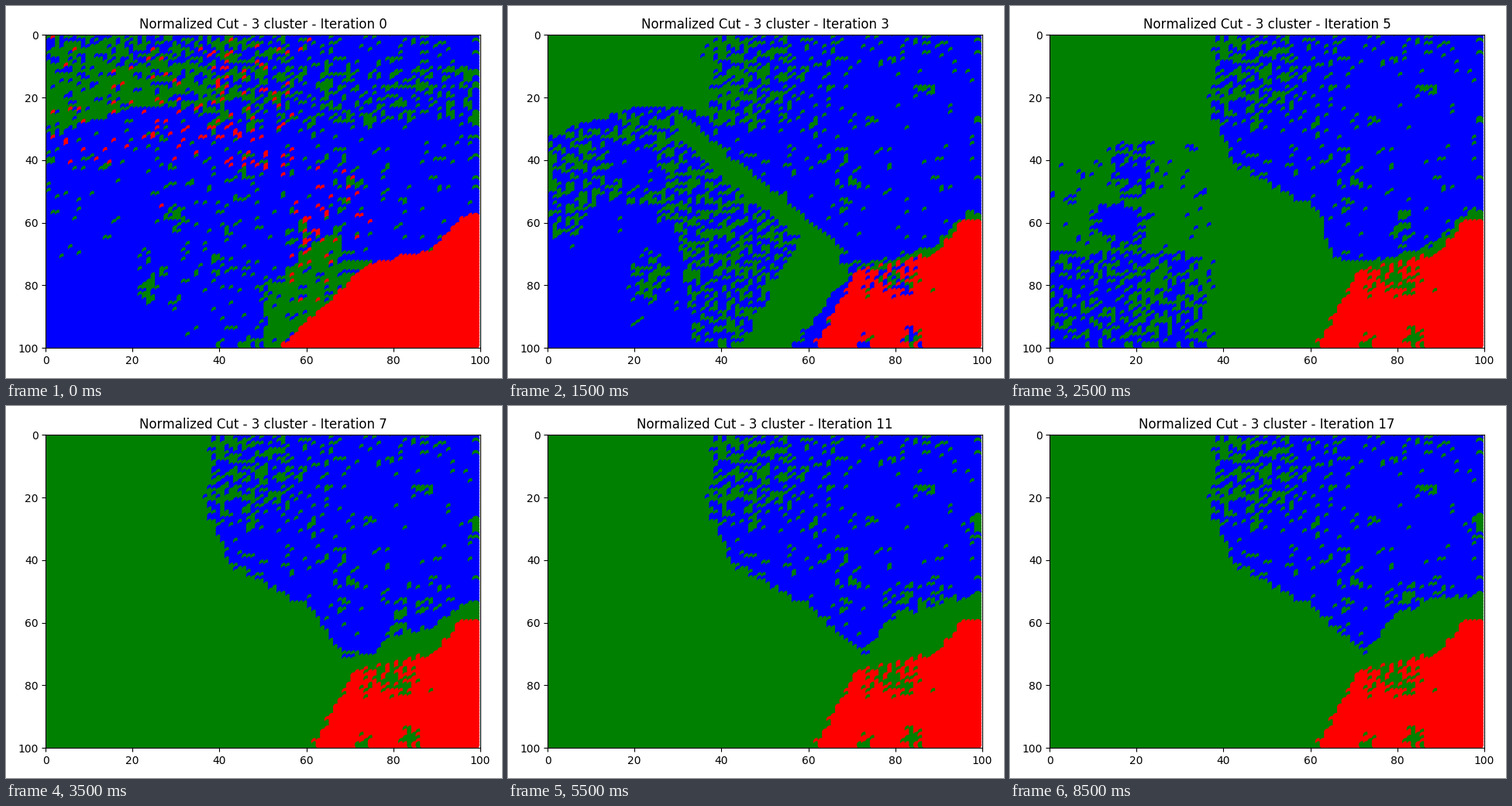
Animation, 640 px wide and 480 px high, one loop 9000 ms. Source, as a matplotlib script:

```python
import numpy as np
import matplotlib.pyplot as plt
from matplotlib.animation import FuncAnimation

N, STEPS = 100, 18
COLORS = np.array([(0, 0, 1, 1), (0, 0.5, 0, 1), (1, 0, 0, 1)])
X, Y = np.meshgrid(np.arange(N), np.arange(N))
# Overlapping discs leave only their upper left part visible.
x, y = X - 0.4, Y - 0.8
up = 100 - y


def ramp(v, a, b):
    """0 before a, 1 after b, straight in between."""
    return np.clip((v - a) / (b - a), 0, 1)


def inside(d, soft=1.5):
    """Soft test for a positive distance."""
    return np.clip(0.5 + d / soft, 0, 1)


def bump(cx, cy, rx, ry):
    r2 = ((x - cx) / rx) ** 2 + ((y - cy) / ry) ** 2
    return np.exp(-r2**2)


def mix(a, b, t):
    return a + (b - a) * t


def ranked_noise(seed, along, down):
    """Evenly spread noise with slight streaks."""
    n = np.random.default_rng(seed).random((N, N))
    n = n + along * np.roll(n, 1, axis=1) + down * np.roll(n, 1, axis=0)
    return n.ravel().argsort().argsort().reshape(N, N) / N**2


green_noise = ranked_noise(4, 0.3, 0.2)
red_noise = ranked_noise(9, 0, 0)

# Edges shared by several stages
red_top = 73 - 5 * ramp(x, 74, 89) - 11 * ramp(x, 89, 96)
crown = 32 - 9 * ramp(x, 0, 20) + 5 * ramp(x, 30, 40)
diagonal = 31 + 1.15 * (x - 32)

# Chance of green inside the blue area
haze = (0.03 + 0.5 * ramp(-x, -66, -40) * ramp(-y, -30, -21)
        + 0.13 * ramp(-y, -11, -3)
        + 0.06 * ramp(-x, -75, -50) * ramp(-y, -60, -40)
        + 0.25 * bump(68, 47, 2.5, 10) + 0.4 * bump(86, 18, 4, 2))


def first_green():
    crown_part = 0.62 + 0.27 * ramp(y, 6, 13) - 0.55 * ramp(x, 24, 52)
    wedge = inside(y - 82 + 1.25 * (x - 50)) * inside(x - 50) * inside(68 - x)
    seam = inside(y - 72) * inside(x - 66) * inside(75 - x)
    strays = 0.05 + 0.06 * bump(40, 65, 14, 35)
    strays = strays * inside(70 - y - 40 * ramp(x, 15, 22) + 80 * ramp(x, 22, 30))
    clumps = (0.5 * bump(30, 57, 3, 3) + 0.45 * bump(22, 70, 2.5, 5)
              + 0.5 * bump(24, 82, 2, 5) + 0.45 * bump(48, 98, 3, 3)
              + 0.45 * bump(59, 64, 4, 5))
    left = np.maximum(strays + clumps, crown_part * inside(crown - y))
    field = np.where(x > 40, np.maximum(left, haze), left)
    return np.maximum(field, 0.88 * np.maximum(wedge, seam))


def spread_green():
    crown_part = 1 - 0.32 * ramp(x, 34, 41) - 0.7 * ramp(x, 44, 60)
    crown_part = crown_part * inside(crown - y)
    band = inside(4.5 - abs(y - diagonal)) * inside(x - 29) * inside(67 - x)
    body = (inside(y - diagonal) * inside(x - 44 - 0.38 * up)
            * inside(56 + 0.55 * up - x))
    floor = 64 - 12 * ramp(x, 6, 12) + 12 * ramp(x, 22, 30) + 40 * ramp(x, 30, 34)
    mixed = (0.48 * inside(y - np.maximum(crown, diagonal)) * inside(floor - y, 5)
             * inside(58 + 0.3 * up - x) * (1 - bump(20, 41, 7, 8)))
    mixed = mixed + 0.4 * bump(23, 75, 5, 10) * inside(31 - x)
    # Green growing into the rim and the gaps of the red area
    rim = inside(y - red_top + 1) * mix(0.5, 0.95, ramp(x, 84, 88)) * inside(x - 70)
    field = np.where((x > 38) & (y < diagonal), haze, 0.01)
    for part in (crown_part, band, body, mixed, rim):
        field = np.maximum(field, part)
    return field


def settled_green(k):
    """Green holds the left side; blue keeps a shrinking upper right zone."""
    s = 1 - (1 - ramp(k, 5, 13)) ** 2
    edge = (25 + 18 * ramp(x, 37, 44) + 13 * ramp(x, 46, 62)
            + mix(19, 13, s) * ramp(x, 62, mix(66, 73, s)))
    last = 50 + 6 * ramp(-x, -100, -80) + 13 * ramp(-x, -80, -73)
    limit = np.minimum(edge, mix(red_top - 1.5, last, s))
    zone = inside(limit - y, 3) * inside(x - 37, 3)
    late = 0.35 * s * (bump(86, 52, 8, 6) + bump(98, 28, 2, 4))
    field = mix(1, haze + late + 0.4 * bump(81, 61, 3, 6), zone)
    left_blue = (0.06 + 0.65 * bump(19, 42, 5, 9) + 1.1 * bump(16, 60, 5.5, 6.5)
                 + 0.55 * inside(y - 69) * inside(34 - x, 4)
                 - 0.25 * bump(25, 80, 3, 12))
    left_blue = left_blue * inside(y - 34) * inside(38 - x)
    return field - left_blue * ramp(-k, -7, -5)


def red(k):
    t = ramp(k, 0, 3)
    area = (inside(y - red_top - 1.5 * t)
            * inside(x - mix(53, 61, t) - mix(0.78, 0.4, t) * up))
    gaps = (0.55 * bump(79, 78, 7, 5) + 0.75 * bump(84, 97, 2.5, 5)
            + 0.7 * bump(73, 99, 2, 3))
    trail = inside(9 - abs(y - 20 - 0.75 * (x - 25)), 6) * inside(x - 26) * inside(75 - x)
    specks = (0.025 * inside(40 - y) * inside(62 - x) + 0.05 * trail
              + 0.06 * bump(47, 15, 9, 14) + 0.07 * bump(61, 70, 6, 15))
    return np.maximum(area * (1 - t * gaps), specks * (1 - t))


GREEN_0, GREEN_3, GREEN_5 = first_green(), spread_green(), settled_green(5)


def green(k):
    if k < 3:
        return mix(GREEN_0, GREEN_3, k / 3)
    if k < 5:
        return mix(GREEN_3, GREEN_5, (k - 3) / 2)
    return settled_green(k)


def colors(k):
    lab = (green(k) > green_noise).astype(int)
    lab[red(k) > red_noise] = 2
    return COLORS[lab.T.ravel()]


def title(k):
    return f"Normalized Cut - 3 cluster - Iteration {k}"


plt.rcParams["font.family"] = "DejaVu Sans"
plt.rcParams["text.kerning_factor"] = 6
fig, ax = plt.subplots(figsize=(6.4, 4.8), dpi=100)
# Column by column, so each column overlaps the one to its left
dots = ax.scatter(X.T.ravel(), Y.T.ravel(), c=colors(0), linewidths=1)
ax.set_xlim(0, N)
ax.set_ylim(N, 0)
heading = ax.set_title(title(0))
fig.tight_layout()


def draw(k):
    dots.set_color(colors(k))
    heading.set_text(title(k))
    return dots, heading


anim = FuncAnimation(fig, draw, frames=STEPS, interval=500, repeat=True,
                     repeat_delay=0, blit=False)
plt.show()
```
